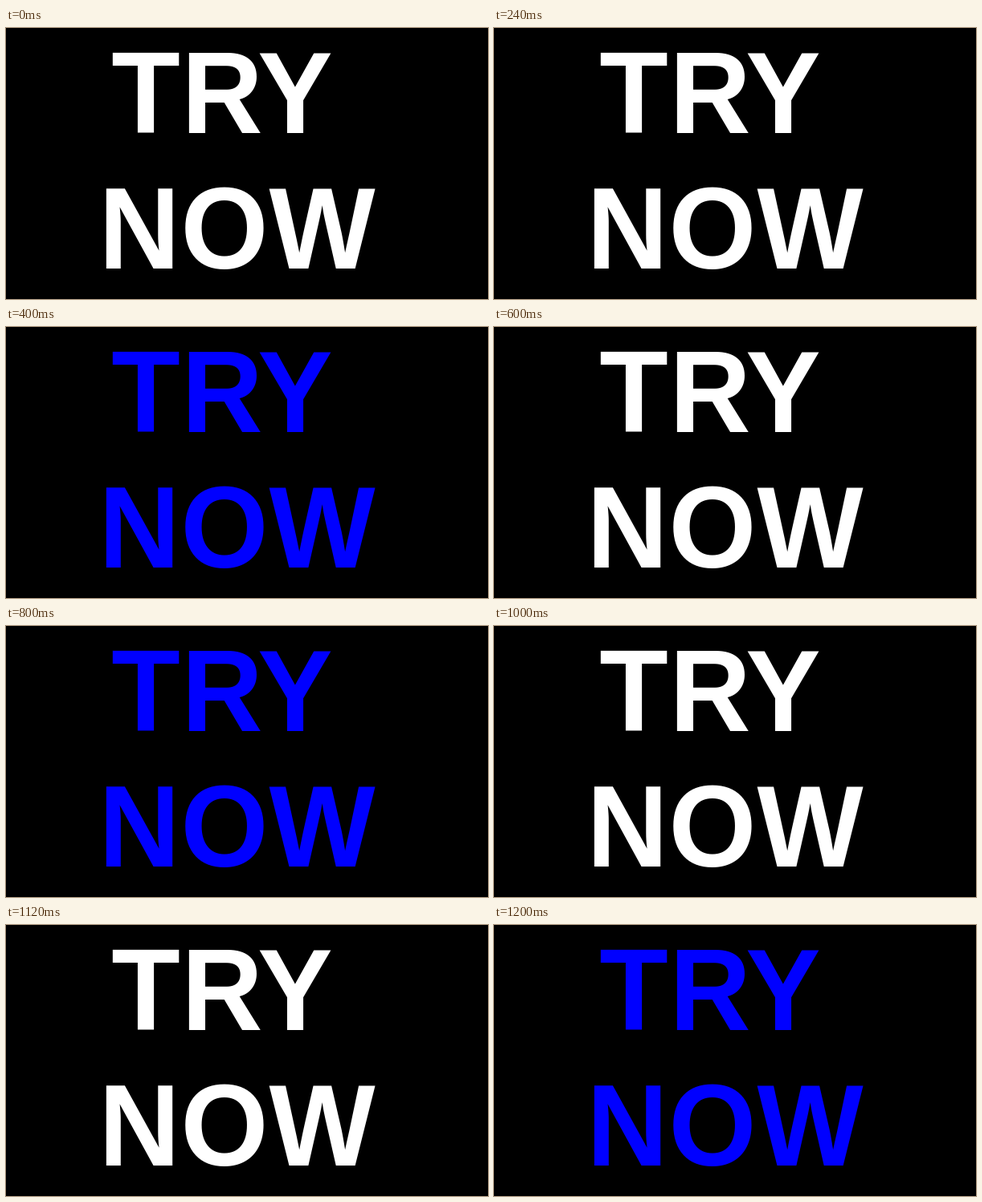
Recreate the animation shown at these times as an HTML page. Size 600x338 px, loop 1.4 s.

```html
<!DOCTYPE html>
<html lang="en">
<head>
<meta charset="utf-8">
<title>Try now</title>
<style>
  html, body {
    margin: 0;
    width: 100%;
    height: 100%;
    overflow: hidden;
    background: #000;
  }
  svg {
    display: block;
    width: 600px;
    height: 338px;
  }
  text {
    font: bold 140px "Liberation Sans", Arial, sans-serif;
    fill: #fff;
    animation: blink 1400ms step-end infinite;
  }
  /* A long white hold, then an even 200 ms blink */
  @keyframes blink {
    0%, 42.857%, 71.428% { fill: #fff; }
    28.571%, 57.142%, 85.714% { fill: #00f; }
  }
</style>
</head>
<body>
<svg viewBox="0 0 600 338">
  <text transform="translate(0 131) scale(1 1.038)" x="131.2 218.6 313.2">TRY</text>
  <text transform="translate(0 300) scale(1 1.038)" x="115.6 217.6 327.4">NOW</text>
</svg>
</body>
</html>
```
